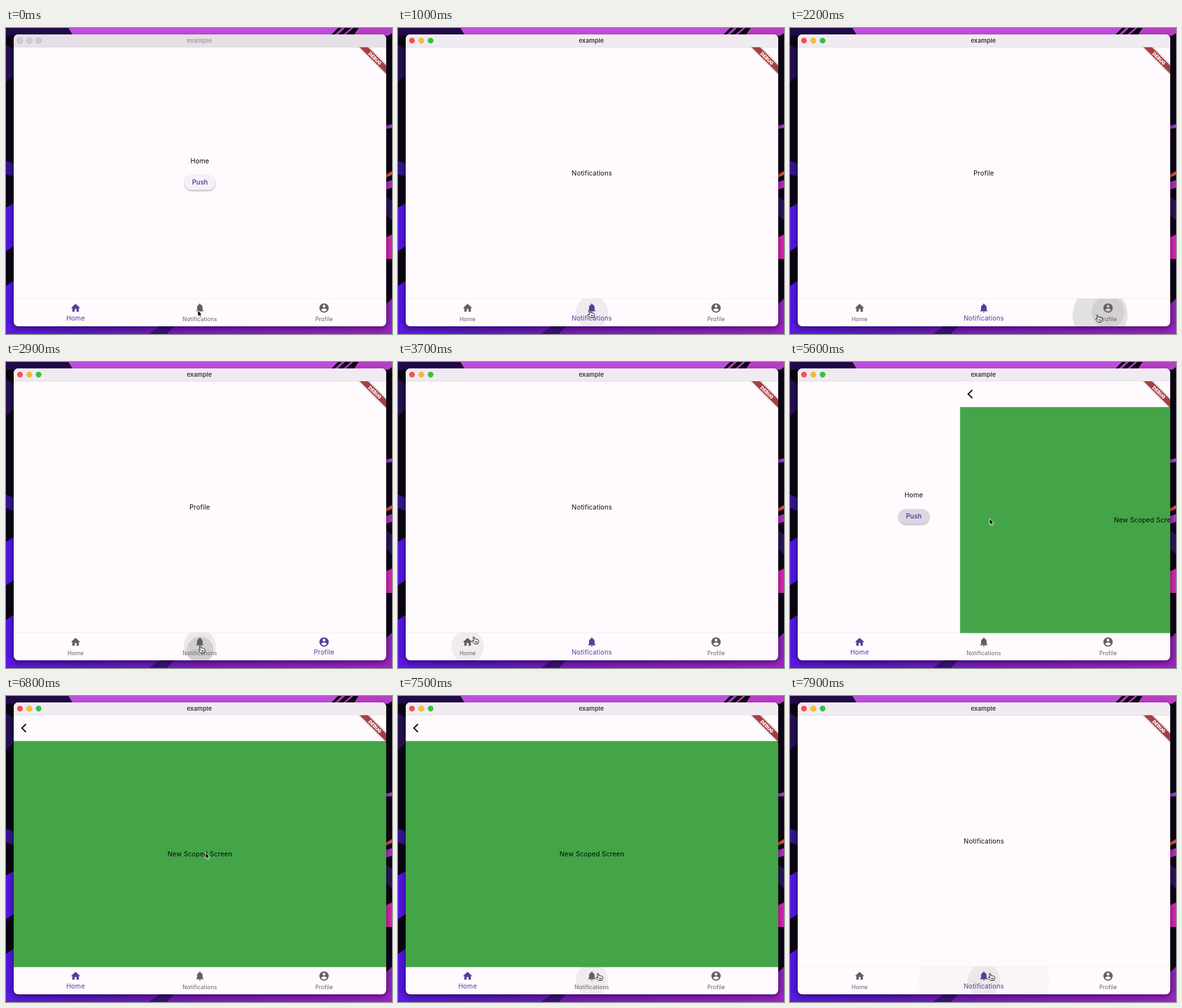
Write an HTML page that moves like this. It is 600 px wide and 477 px high and loops after 8000 ms.

```html
<!DOCTYPE html>
<html lang="en">
<head>
<meta charset="utf-8">
<title>example</title>
<style>
html, body { margin: 0; width: 100%; height: 100%; overflow: hidden; background: #0b0414; }
svg { display: block; width: 600px; height: 477px; }
text { font: 400 10.15px Inter, "Open Sans", sans-serif; letter-spacing: .17px; text-anchor: middle; fill: #0c090e; }
#title { font-size: 9.5px; font-weight: 600; letter-spacing: .05px; }
#push text { font-weight: 500; letter-spacing: .1px; fill: #46298a; }
.banner { font-size: 7.2px; font-weight: 900; letter-spacing: 0; fill: #fff; }
</style>
</head>
<body>
<svg viewBox="0 0 600 477">
  <defs>
    <clipPath id="win"><rect x="12" y="10" width="579" height="455" rx="7"/></clipPath>
    <clipPath id="view"><path d="M12 30H591V422.8H12z"/></clipPath>
    <clipPath id="bar"><path d="M12 422H591V465H12z"/></clipPath>
    <linearGradient id="floor">
      <stop offset="0" stop-color="#5a1ae4"/><stop offset=".2" stop-color="#5a1ac4"/>
      <stop offset=".5" stop-color="#7c1cc0"/><stop offset="1" stop-color="#9c24c4"/>
    </linearGradient>
    <filter id="soft" x="-10%" y="-10%" width="120%" height="120%"><feGaussianBlur stdDeviation="4"/></filter>
    <filter id="blur" x="-30%" y="-80%" width="160%" height="260%"><feGaussianBlur stdDeviation="1.5"/></filter>
  </defs>

  <!-- wallpaper -->
  <path fill="#0b0414" d="M0 0H600V477H0z"/>
  <path fill="#bd4fdc" d="M97 0H516L504 12H104z"/>
  <path fill="#220a48" d="M0 0H97L104 12H0z"/>
  <path fill="#b83cc4" d="M522 0H527L514 12H509zM536 0H540L526 12H522zM548 0H600V8L594 12H540z"/>
  <path fill="#24104f" d="M0 26L12 34V74L0 84z"/>
  <path fill="#34148c" d="M0 207L12 211V232L0 228z"/>
  <path fill="#5216dc" d="M0 280L12 273V340L0 348zM0 402L12 394V477H0z"/>
  <path fill="#a23ad0" d="M591 152L600 150V156L591 157z"/>
  <path fill="#db4b38" d="M591 228L600 223V229L591 233z"/>
  <path fill="#b42bc2" d="M591 240L600 237V249L591 252z"/>
  <path fill="#2c1458" d="M591 262L600 270V300L591 292z"/>
  <path fill="#d824b2" d="M591 326L600 322V360H591z"/>
  <path fill="#8d24bc" d="M591 430L600 422V477H591z"/>
  <path fill="url(#floor)" d="M0 462H600V477H0z"/>
  <path fill="#3c107c" d="M222 477L240 464H262L250 477z"/>
  <rect x="11" y="14" width="581" height="455" rx="8" opacity=".45" filter="url(#soft)"/>

  <g clip-path="url(#win)">
    <path fill="#fefafd" d="M12 10H591V465H12z"/>
    <path id="head" d="M12 10H591V30H12z"/>
    <path fill="#d9d4d9" d="M12 29.5H591V30.2H12z"/>
    <path fill="#ece7ec" d="M12 421.5H591V422.3H12z"/>
    <g id="lights" stroke-width=".6"></g>
    <text id="title" x="300.5" y="22.8">example</text>

    <g clip-path="url(#view)">
      <g id="home">
        <text x="301.3" y="211">Home</text>
        <g id="push">
          <rect x="278" y="231" width="47" height="22.5" rx="11.2" opacity=".4" filter="url(#blur)"/>
          <rect x="277.5" y="229.5" width="48" height="23" rx="11.5" fill="#f6f0f8"/>
          <rect id="shade" x="277.5" y="229.5" width="48" height="23" rx="11.5" fill="#27183a"/>
          <text x="301.4" y="244.4">Push</text>
        </g>
      </g>
      <text id="notes" x="301.4" y="229.8">Notifications</text>
      <text id="profile" x="301.2" y="229.8">Profile</text>
      <g id="detail">
        <path fill="#fefafd" d="M12 30H591V71H12z"/>
        <path fill="#43a547" d="M12 70.3H591V422.8H12z"/>
        <path fill="none" stroke="#17131a" stroke-width="2" d="M31 43.8L24.6 50L31 56.2"/>
        <text x="301.3" y="250">New Scoped Screen</text>
      </g>
      <g transform="translate(591 30) rotate(45)">
        <path d="M-40 20.3H40V29H-40z" opacity=".55" filter="url(#blur)"/>
        <path fill="#a93e42" d="M-40 20.3H40V29H-40z"/>
        <text class="banner" y="27.3">DEBUG</text>
      </g>
    </g>

    <g id="tabs" clip-path="url(#bar)"></g>
  </g>

  <g id="cursor">
    <path id="arrow" stroke="#fff" stroke-width=".9" d="M0 0V9.7L2.2 7.6L3.7 11.1L5.5 10.4L4 7H7z"/>
    <path id="hand" fill="#fff" stroke="#151515" stroke-width="1" stroke-linejoin="round"
      d="M-1.4 1Q-.4-.7.7 1L1.6 4Q3 3.1 3.6 4.4Q5 3.7 5.6 5Q7.2 4.8 7.4 6.5L7 9L6 11.5H.9L-2.7 7.6Q-3.2 6-1.5 6.2L0 7.2zM2.4 7L2.8 9.8M4.2 6.9L4.5 9.6"/>
  </g>
</svg>
<script>
const LOOP = 8000, PUSH = 5490;
const $ = id => document.getElementById(id);
const set = (el, attrs) => { for (const k in attrs) el.setAttribute(k, attrs[k]); };
const show = (el, on) => set(el, { display: on ? 'inline' : 'none' });
const clamp = v => Math.min(1, Math.max(0, v));
const mix = (a, b, p) => a + (b - a) * p;
const add = (parent, name, attrs) => {
  const el = document.createElementNS('http://www.w3.org/2000/svg', name);
  set(el, attrs);
  return parent.appendChild(el);
};

function bezier(x1, y1, x2, y2) {
  const at = (a, b, u) => 3 * u * (1 - u) ** 2 * a + 3 * u * u * (1 - u) * b + u ** 3;
  return v => {
    if (v <= 0 || v >= 1) return clamp(v);
    let lo = 0, hi = 1;
    for (let i = 0; i < 24; i++) {
      const u = (lo + hi) / 2;
      if (at(x1, x2, u) < v) lo = u; else hi = u;
    }
    return at(y1, y2, lo);
  };
}
const ease = bezier(.4, 0, .2, 1);
const glide = bezier(.4, 0, .3, 1);
const slide = bezier(.35, .91, .33, .97);

// time, x, y of the pointer tip
const path = [
  [0, 298, 440], [1150, 298, 440], [1900, 478, 447], [2350, 478, 447],
  [2800, 302, 442], [3150, 302, 442], [3650, 118, 428], [4000, 118, 428],
  [4900, 302, 259], [5020, 302, 259], [5250, 310, 244], [6850, 310, 244],
  [7450, 311, 432], [LOOP, 311, 432]
];
const taps = [
  { tab: 0, down: -2000, up: -1900, x: 108 },
  { tab: 1, down: 600, up: 720, x: 298 },
  { tab: 2, down: 2070, up: 2190, x: 473 },
  { tab: 1, down: 2830, up: 2950, x: 302 },
  { tab: 0, down: 3780, up: 3900, x: 118 },
  { tab: 1, down: 7610, up: 7730, x: 304 }
];

const icons = [
  'M10 20v-6h4v6h5v-8h3L12 3 2 12h3v8z',
  'M12 22c1.1 0 2-.9 2-2h-4c0 1.1.9 2 2 2zM18 16v-5c0-3.1-1.6-5.6-4.5-6.3V4a1.5 1.5 0 0 0-3 0v.7C7.6 5.4 6 7.9 6 11v5l-2 2v1h16v-1z',
  'M12 2a10 10 0 1 0 0 20a10 10 0 1 0 0-20zM12 5a3 3 0 1 1 0 6a3 3 0 1 1 0-6zM12 19.2c-2.5 0-4.7-1.3-6-3.2 0-2 4-3.1 6-3.1s6 1.1 6 3.1c-1.3 1.9-3.5 3.2-6 3.2z'
];
const bar = $('tabs');
const splash = add(bar, 'circle', {});
const tabs = ['Home', 'Notifications', 'Profile'].map((name, i) => {
  const x = 108.2 + 193.1 * i;
  const halo = add(bar, 'circle', { cx: x, cy: 443.3, r: 25.4 });
  const icon = add(bar, 'path', {
    d: icons[i], 'fill-rule': 'evenodd',
    transform: `translate(${x} 436.5) scale(.725) translate(-12 -12)`
  });
  const label = add(bar, 'text', { y: -2.8 });
  label.textContent = name;
  return { x, halo, icon, label };
});
const lights = ['#f5514f', '#fbbc2e', '#2cc63f'].map((color, i) => ({
  color, el: add($('lights'), 'circle', { cx: 21.7 + 14.5 * i, cy: 19.6, r: 4.3 })
}));

function pointer(t) {
  const i = path.findIndex(k => k[0] > t), a = path[i - 1], b = path[i];
  const p = glide((t - a[0]) / (b[0] - a[0]));
  return [mix(a[1], b[1], p), mix(a[2], b[2], p)];
}

function drawWindow(active) {
  set($('head'), { fill: active ? '#f0ebf0' : '#e5dfe6' });
  $('title').style.fill = active ? '#3b363d' : '#a29da4';
  for (const { el, color } of lights)
    set(el, { fill: active ? color : '#d0cad1', stroke: active ? '#00000022' : '#aaa4ac' });
}

function drawPages(t, page) {
  const p = t < PUSH ? 0 : slide((t - PUSH) / 500);
  show($('home'), page === 0 && p < 1);
  show($('notes'), page === 1);
  show($('profile'), page === 2);
  show($('detail'), page === 0 && p > 0);
  set($('home'), { transform: `translate(${-193 * p} 0)` });
  set($('detail'), { transform: `translate(${579 * (1 - p)} 0)` });
  const hover = clamp((t - 5160) / 60), press = clamp((t - 5360) / 150);
  set($('shade'), { opacity: .05 * hover + .07 * press });
}

function drawTabs(t, over) {
  const last = taps.findLastIndex(k => k.up <= t);
  const now = taps[last].tab, before = last ? taps[last - 1].tab : -1;
  const e = ease((t - taps[last].up) / 200);
  const tap = taps.findLast(k => k.down <= t);
  const fade = clamp(1 - (t - tap.up) / 200);

  const r = t < tap.up ? 35 * (t - tap.down) / (tap.up - tap.down) : Math.min(102, 35 + (t - tap.up) / 1.4);
  set(splash, {
    cx: mix(tap.x, tabs[tap.tab].x, r / 102), cy: mix(450, 443.3, r / 102),
    r, opacity: .11 * fade
  });

  tabs.forEach(({ x, halo, icon, label }, i) => {
    const p = i === now ? e : i === before ? 1 - e : 0;
    const color = `rgb(${mix(99, 88, p)}, ${mix(94, 60, p)}, ${mix(100, 154, p)})`;
    icon.style.fill = label.style.fill = color;
    set(label, { transform: `translate(${x} 459) scale(${mix(12 / 14, 1, p)})` });
    set(halo, { opacity: (over === i ? .058 : 0) + (tap.tab === i ? .015 * fade : 0) });
  });
  return now;
}

function draw(t) {
  const active = t >= 300;
  const [x, y] = pointer(t);
  const over = active && y > 422 ? Math.floor((x - 12) / 193) : -1;
  const onPush = t < PUSH + 60 && y > 229 && y < 252.5 && x > 278 && x < 326;
  drawWindow(active);
  drawPages(t, drawTabs(t, over));
  set($('cursor'), { transform: `translate(${x} ${y})` });
  show($('hand'), over >= 0 || onPush);
  show($('arrow'), over < 0 && !onPush);
}

const start = performance.now();
function frame() {
  draw((performance.now() - start) % LOOP);
  requestAnimationFrame(frame);
}
frame();
</script>
</body>
</html>
```
